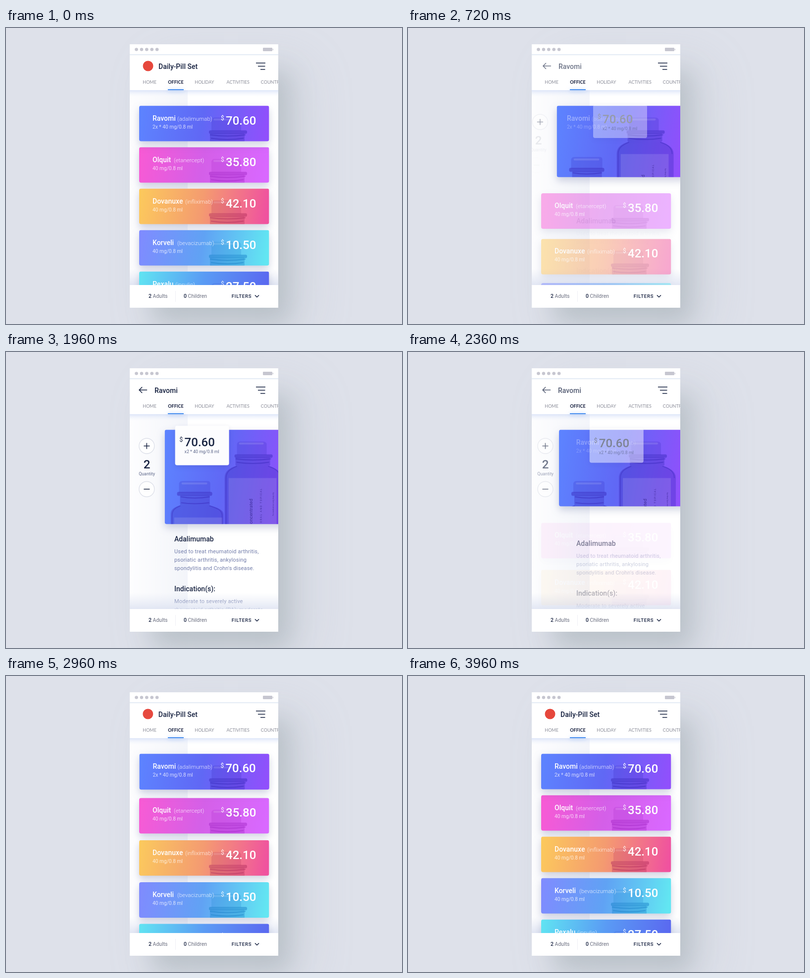
Recreate the animation shown at these times as an HTML page. Size 800 px wide and 600 px high, loop 4 s.

```html
<!DOCTYPE html>
<html lang="en">
<head>
<meta charset="utf-8">
<title>Medicine list</title>
<style>
  html, body { margin: 0; width: 100%; height: 100%; overflow: hidden; background: #dee1ea; }
  #stage { position: relative; width: 800px; height: 600px; overflow: hidden; background: #dee1ea; }
  #shade { position: absolute; left: 250px; top: 33px; width: 300px; height: 534px;
    box-shadow: 34px 44px 46px -12px rgba(150,163,168,.4), 54px 44px 90px rgba(165,174,184,.22); }
  svg { position: absolute; left: 0; top: 0; display: block; }
  text { font-family: Roboto, sans-serif; fill: #15203f; white-space: pre; }
  .m { font-weight: 500; }
  .tab { font: 9px Lato, sans-serif; fill: #8b8d99; }
  .on { fill: #101a3a; font-weight: 700; }
  .grey { fill: #6b6f80; }
  .para { font-size: 11px; letter-spacing: .18px; fill: #6f7aa8; }
  .ink { fill: none; stroke: #15203f; stroke-width: 1.5; }
  .card text { fill: #fff; }
  .gen { font-size: 11.5px; font-weight: 300; opacity: .85; }
  .dose { font-size: 10.2px; opacity: .75; }
  .print text { fill: #2b1b80; opacity: .7; text-anchor: end; }
  .lift { filter: drop-shadow(0 7px 8px rgba(70,80,140,.26)); }
  .box { filter: drop-shadow(0 4px 6px rgba(40,40,120,.15)); }
</style>
</head>
<body>
<div id="stage">
<div id="shade"></div>
<svg width="800" height="600" viewBox="0 0 800 600">
  <defs id="defs">
    <clipPath id="phone"><rect x="250" y="33" width="300" height="534"/></clipPath>
    <clipPath id="heroClip"><rect id="heroCut" width="262.5" height="72" rx="4"/></clipPath>
    <clipPath id="rowClip"><rect width="262.5" height="72" rx="4"/></clipPath>
    <linearGradient id="side"><stop stop-color="#fdfdfe"/><stop offset="1" stop-color="#f3f5fa"/></linearGradient>
    <linearGradient id="under" x2="0" y2="1">
      <stop stop-color="#c9d6f5" stop-opacity=".75"/><stop offset="1" stop-color="#e9effc" stop-opacity="0"/>
    </linearGradient>
    <linearGradient id="fade" x2="0" y2="1">
      <stop stop-color="#dfe4f2" stop-opacity="0"/><stop offset="1" stop-color="#d9dff0" stop-opacity=".75"/>
    </linearGradient>
    <g id="bottles">
      <g fill="currentColor">
        <g fill-opacity=".32">
          <path d="M145 73C130 78 121 84 121 98V192H236V98C236 84 224 78 209 73Z"/>
          <path d="M32 153C18 158 12 161 12 172V192H119V172C119 161 104 158 90 153Z"/>
          <rect x="143" y="56" width="70" height="17" rx="2"/>
          <rect x="31" y="133" width="60" height="20" rx="2"/>
        </g>
        <g fill-opacity=".2">
          <path d="M146 51V29Q147 24 153 24H198Q205 24 206 29V51Z"/>
          <path d="M29 128V109Q30 104 36 104H86Q92 104 92 109V128Z"/>
        </g>
        <g fill-opacity=".45">
          <rect x="141" y="50" width="77" height="7" rx="3"/>
          <rect x="25" y="126" width="71" height="8" rx="3"/>
        </g>
      </g>
      <g fill="none" stroke="currentColor" stroke-opacity=".45" stroke-width="2">
        <path d="M143 59Q178 64 215 59M145 66Q178 71 211 66M32 136Q60 141 91 136M33 148Q60 152 90 148"/>
        <path d="M146 74C131 80 124 86 124 98V192M209 74C225 79 233 86 233 98M32 154C20 159 15 163 15 174V192M90 154C106 159 116 163 116 174V192" stroke-opacity=".35"/>
      </g>
      <g fill="#fff" fill-opacity=".12">
        <rect x="129" y="98" width="97" height="94"/><rect x="19" y="178" width="97" height="14"/>
        <rect x="150" y="26" width="50" height="4" rx="2"/><rect x="34" y="107" width="52" height="4" rx="2"/>
      </g>
    </g>
  </defs>
  <g clip-path="url(#phone)">
    <rect x="250" y="33" width="300" height="534" fill="#fff"/>
    <rect x="250" y="126" width="117" height="395" fill="url(#side)"/>
    <g id="about">
      <text class="m" x="340" y="384" font-size="14">Adalimumab</text>
      <g>
        <text class="para" x="340" y="408">Used to treat rheumatoid arthritis,</text>
        <text class="para" x="340" y="425">psoriatic arthritis, ankylosing</text>
        <text class="para" x="340" y="442">spondylitis and Crohn's disease.</text>
        <text class="m" x="340" y="485" font-size="14">Indication(s):</text>
        <text class="para" x="340" y="509">Moderate to severely active</text>
        <text class="para" x="340" y="526">rheumatoid arthritis (RA); moderate</text>
      </g>
    </g>
    <rect x="250" y="488" width="300" height="33" fill="url(#fade)"/>
    <g id="rows"></g>
    <g class="qty">
      <circle cx="284.5" cy="190.5" r="15.5" fill="#fff" stroke="#dcdfe8" stroke-width="1.3"/>
      <path class="ink" d="M278.5 190.5h12M284.5 184.5v12"/>
    </g>
    <g class="qty" text-anchor="middle">
      <text class="m" x="284.7" y="236" font-size="24">2</text>
      <text x="284.7" y="250" font-size="8.8" style="fill:#5a6488">Quantity</text>
    </g>
    <g class="qty">
      <circle cx="284.5" cy="278" r="15.5" fill="#fff" stroke="#dcdfe8" stroke-width="1.3"/>
      <path class="ink" d="M278.5 278h12"/>
    </g>
    <g id="hero"></g>
    <rect id="tag" class="box" width="109" rx="4" fill="#fff"/>
    <g id="price">
      <text x="-10" y="-9" font-size="12" style="fill:inherit">$</text>
      <text class="m" font-size="24" style="fill:inherit">70.60</text>
      <text id="unit" x="0" y="14" font-size="8.8" style="fill:#5a6488">x2 * 40 mg/0.8 ml</text>
    </g>

    <rect x="250" y="126" width="300" height="13" fill="url(#under)" opacity=".8"/>
    <rect x="250" y="33" width="300" height="93" fill="#fff"/>
    <path d="M250 54.3h300" stroke="#dbe6f2" stroke-width="1.4"/>
    <g id="dots" fill="#c6c6d0">
      <rect x="519" y="40" width="19" height="7" rx="1.2"/><rect x="538.7" y="42.3" width="1.4" height="2.6"/>
    </g>
    <g id="home">
      <circle cx="287" cy="77" r="10.5" fill="#e6473c"/>
      <text class="m" x="308" y="82.5" font-size="14">Daily-Pill Set</text>
    </g>
    <g id="back">
      <path class="ink" d="M285 77H269M275 71l-6 6 6 6"/>
      <text class="m" x="300" y="82.5" font-size="14">Ravomi</text>
    </g>
    <path class="ink" d="M505 71h19M509 77.5h14.5M514 84h9.5"/>
    <text class="tab" x="276.3" y="113.3">HOME</text>
    <text class="tab on" x="327.3" y="113.3">OFFICE</text>
    <text class="tab" x="381.3" y="113.3">HOLIDAY</text>
    <text class="tab" x="445.5" y="113.3">ACTIVITIES</text>
    <text class="tab" x="514.8" y="113.3">COUNTRIES</text>
    <rect x="327" y="124" width="32" height="2" fill="#4a90f0" style="filter:drop-shadow(0 1px 4px rgba(74,144,240,.6))"/>

    <rect x="250" y="521" width="300" height="46" fill="#fff"/>
    <g font-size="10.5">
      <text x="288" y="547.3"><tspan class="m">2</tspan><tspan class="grey"> Adults</tspan></text>
      <text x="359" y="547.3"><tspan class="m">0</tspan><tspan class="grey"> Children</tspan></text>
    </g>
    <path d="M342.5 533v22" stroke="#eeeff4"/>
    <text class="m" x="455.8" y="547.2" font-size="9.6" letter-spacing=".75">FILTERS</text>
    <path class="ink" d="M503 541.5l4 4 4-4"/>
  </g>
</svg>
</div>
<script>
const LOOP = 4000, OPEN = 10, SHUT = 1800, DUR = 1320, ROW_DUR = 1165;
// name, generic, generic x, dose, price, bottle tint, gradient
const meds = [
  ['Ravomi', 'adalimumab', 77, '2x * 40 mg/0.8 ml', '', '#3526b8', ['#5d84ff', '#6068f5', '#9050fc']],
  ['Olquit', 'etanercept', 70, '40 mg/0.8 ml', '35.80', '#a024c4', ['#f85ad4', '#d45fe8', '#d968ff']],
  ['Dovanuxe', 'infliximab', 93, '40 mg/0.8 ml', '42.10', '#b02c5c', ['#fcca5c', '#f49b70', '#f0529f']],
  ['Korveli', 'bevacizumab', 77, '40 mg/0.8 ml', '10.50', '#147cc6', ['#808bff', '#60a2f4', '#62e6f2']],
  ['Pexalu', 'insulin', 73, '40 mg/0.8 ml', '27.50', '#2a52cc', ['#60e4f2', '#5a9bf4', '#5a68f0']]
];
// travel and closing delay of the rows below the first
const travel = [[120, 142], [131, 158], [138, 168], [142, 170]];

const $ = id => document.getElementById(id);
const clamp = x => Math.min(1, Math.max(0, x));
const ease = x => (x = clamp(x), x < .5 ? 4 * x ** 3 : 1 - 4 * (1 - x) ** 3);
const smooth = x => (x = clamp(x), x * x * (3 - 2 * x));
const mix = (a, b, p) => a + (b - a) * p;

const print = [[177, 140, 9.5, 0, 'concentrated'], [196, 118, 5, 1.6, 'ORAL AND TOPICAL'],
  [220, 127, 3.6, 0, 'For medical use only, keep dry']]
  .map(([x, y, size, gap, s]) => `<text transform="translate(${x} ${y}) rotate(-90)"
    font-size="${size}" letter-spacing="${gap}">${s}</text>`).join('');

function card([name, gen, gx, dose, price, tint, cols], i) {
  $('defs').insertAdjacentHTML('beforeend', `<linearGradient id="g${i}" x2="1" y2=".12">` +
    cols.map((c, n) => `<stop offset="${n / 2}" stop-color="${c}"/>`).join('') + '</linearGradient>');
  return `<g class="card">
    <g class="lift"><g clip-path="url(#${i ? 'row' : 'hero'}Clip)">
      <rect width="262.5" height="192" fill="url(#g${i})"/>
      <use href="#bottles" color="${tint}"/>
      <g class="print">${i ? '' : print}</g></g></g>
    <g class="label"><text class="m" x="27" y="30" font-size="14">${name}</text>
      <text class="gen" x="${gx}" y="30">(${gen})</text>
      <text class="dose" x="27" y="46">${dose}</text></g>
    ${price && `<text x="165" y="29" font-size="12" opacity=".85">$</text>
      <text class="m" x="175" y="38" font-size="24">${price}</text>`}
  </g>`;
}

$('hero').innerHTML = card(meds[0], 0);
$('rows').innerHTML = meds.slice(1).map((m, i) => card(m, i + 1)).join('');
for (let i = 0; i < 5; i++)
  $('dots').insertAdjacentHTML('beforeend', `<circle cx="${263.5 + 10.4 * i}" cy="43.5" r="3.3"/>`);

const rows = [...$('rows').children];
const label = $('hero').querySelector('.label');
const qty = [...document.querySelectorAll('.qty')];
const [aboutTitle, aboutBody] = $('about').children;

function put(el, x, y, alpha = 1) {
  el.setAttribute('transform', `translate(${x.toFixed(2)} ${y.toFixed(2)})`);
  el.setAttribute('opacity', clamp(alpha).toFixed(3));
}

function draw(t) {
  const opening = t < SHUT;
  const p = opening ? ease((t - OPEN) / DUR) : 1 - ease((t - SHUT) / DUR);
  const rest = 1 - p;

  const rowAlpha = opening ? 1 - smooth((t - 440) / 560) : smooth((t - 2240) / 760);
  rows.forEach((row, i) => {
    const [dist, lag] = travel[i];
    const q = opening ? ease(t / ROW_DUR) : 1 - ease((t - SHUT - lag) / DUR);
    put(row, 269, 241.5 + 84 * i + dist * q, rowAlpha);
  });

  put($('hero'), 269 + 52 * p, 157.5);
  $('heroCut').setAttribute('height', 72 + 120 * p);
  put(label, ((opening ? 41 : 63) - 52) * p, 0, rest);

  const tag = $('tag'), top = mix(165, 149.5, p);
  put(tag, mix(425, 341, p), top, p * p);
  tag.setAttribute('height', mix(213, 229.5, p) - top);
  put($('price'), mix(444, 360, p), mix(195.5, 191.3, p));
  $('price').setAttribute('fill', `rgb(${[21, 32, 63].map(c => Math.round(mix(255, c, p ** 1.6)))})`);
  $('unit').setAttribute('opacity', p);

  const k = opening ? 1 : .4;
  put($('about'), 0, 30 * rest);
  put(aboutTitle, 0, 0, p ** (4 * k));
  put(aboutBody, 0, 0, p ** (7 * k));
  qty.forEach((el, i) => opening
    ? put(el, -(45 + 9 * i) * rest, 0, p ** (2 + 3 * i))
    : put(el, -23 * rest, 0, p ** 1.4));

  put($('home'), -34 * p, 0, 1 - 2.3 * p);
  put($('back'), 10 * rest, 0, (p - .15) / .75);
}

const start = performance.now();
function tick() {
  draw((performance.now() - start) % LOOP);
  requestAnimationFrame(tick);
}
tick();
</script>
</body>
</html>
```
